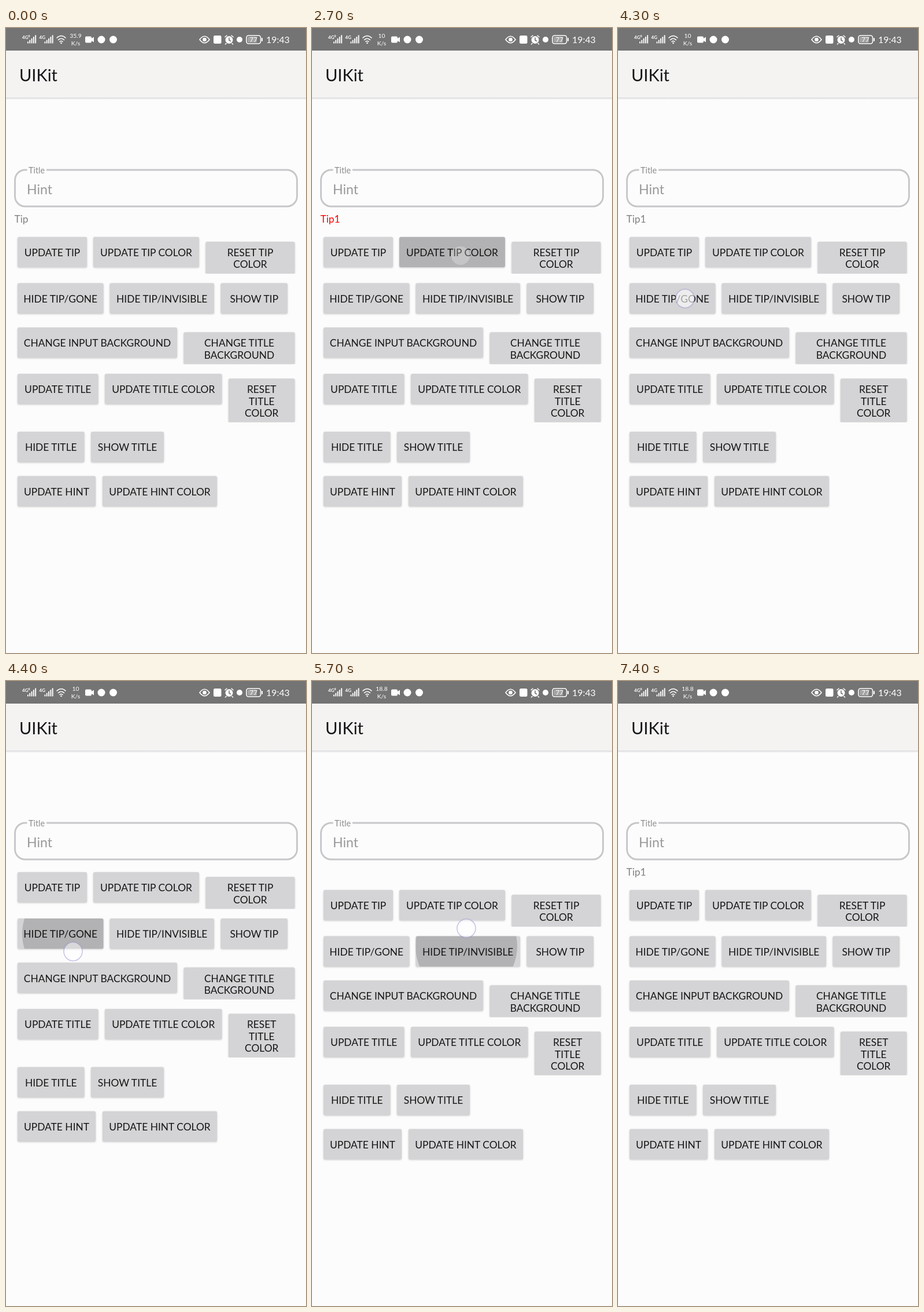
These frames come from a looping animation (519 by 1079 pixels, 8 s). An HTML page:

```html
<!DOCTYPE html>
<html lang="en">
<head>
<meta charset="utf-8">
<title>UIKit</title>
<style>
  html, body { margin: 0; width: 100%; height: 100%; overflow: hidden; background: #fcfcfc; }
  svg { display: block; width: 100%; height: 100%; font-family: Lato, "Open Sans", sans-serif; }
  .button { fill: #d4d3d5; filter: drop-shadow(0 1.5px 1.5px rgba(0, 0, 0, .2)); }
  .cut { clip-path: inset(-4px -4px 0 -4px); }
  .label { font-size: 17.4px; fill: #161616; text-anchor: middle; }
  .line { fill: none; stroke: #fff; stroke-width: 1.6; stroke-linecap: round; }
</style>
</head>
<body>
<svg id="stage" viewBox="0 0 519 1079" xmlns="http://www.w3.org/2000/svg">
  <defs>
    <linearGradient id="edge" x2="0" y2="1">
      <stop offset="0" stop-color="#d8d8dc"/>
      <stop offset="1" stop-color="#fcfcfc"/>
    </linearGradient>
    <clipPath id="pressed"><rect id="pressedRect" rx="3"/></clipPath>
  </defs>
  <rect width="519" height="1079" fill="#fcfcfc"/>

  <rect y="38" width="519" height="82" fill="#f4f3f2"/>
  <rect y="120" width="519" height="4" fill="url(#edge)"/>
  <text x="23" y="91.500" font-size="29" fill="#151518">UIKit</text>

  <rect width="519" height="39" fill="#747474"/>
  <g id="status" fill="#fff">
    <g id="signals"></g>
    <path class="line" d="M88 17q7.500-7 15 0M90.500 20.500q5-4.500 10 0M93 23.500q2.500-2 5 0"/>
    <circle cx="95.500" cy="26" r="1.300"/>
    <g font-size="10.400" text-anchor="middle">
      <text id="speed" x="120.500" y="17.300"></text>
      <text x="120.500" y="30">K/s</text>
    </g>
    <path d="M139 14.500h7q2 0 2 2v1.500l4-2.500v9l-4-2.500v1.500q0 2-2 2h-7q-2 0-2-2v-7q0-2 2-2z"/>
    <circle cx="165" cy="20" r="6.500"/>
    <circle cx="185.500" cy="20" r="6.500"/>
    <path class="line" d="M335 20q8.500-11.500 17 0q-8.500 11.500-17 0z"/>
    <circle cx="343.500" cy="20" r="3.300"/>
    <rect x="359" y="13" width="13.500" height="14" rx="2.500"/>
    <circle cx="386" cy="20.500" r="6.500"/>
    <path class="line" d="M379 15.500l3-2.500M393 15.500l-3-2.500M381 26.500l-1.500 1.500M391 26.500l1.500 1.500"/>
    <path class="line" style="stroke:#747474" d="M386 17v4l2.500 1.500"/>
    <circle cx="404" cy="20" r="5"/>
    <rect class="line" x="416" y="13" width="24.500" height="14" rx="3.500"/>
    <rect x="418" y="15" width="16" height="10" rx="1.500" opacity=".35"/>
    <rect x="442" y="17" width="2" height="6" rx="1"/>
    <text x="428.200" y="24.200" font-size="11.500" text-anchor="middle">77</text>
    <text x="450" y="25.800" font-size="15.900">19:43</text>
  </g>

  <rect x="15.500" y="245" width="488" height="63" rx="17.500" fill="none" stroke="#c7c6ca" stroke-width="2.900"/>
  <rect x="36.500" y="240" width="33.500" height="10" fill="#fcfcfc"/>
  <text x="39" y="251" font-size="14.400" fill="#8c8c8c">Title</text>
  <text x="36" y="287" font-size="23.100" fill="#999">Hint</text>
  <text id="tip" x="14.500" y="336" font-size="17.300"></text>

  <g id="panel">
    <g id="buttons"></g>
    <g clip-path="url(#pressed)"><circle id="ripple"/></g>
    <g id="labels"></g>
  </g>
  <circle id="touch" r="16" fill="#fff" stroke="#8f8fd0" stroke-width="1.600"/>
</svg>
<script>
const LOOP = 8000, STEP = 100, GONE_SHIFT = -30.7, LINE_HEIGHT = 20.4;
const $ = id => document.getElementById(id);

function set(node, attrs) {
  for (const key in attrs) node.setAttribute(key, attrs[key]);
}
function add(parent, tag, attrs, text = '') {
  const node = document.createElementNS('http://www.w3.org/2000/svg', tag);
  set(node, attrs);
  node.textContent = text;
  parent.appendChild(node);
}

// Each row: top edge, then [label, left, right]; "|" breaks a line.
const rows = [
  [360.7, ['UPDATE TIP', 20, 140], ['UPDATE TIP COLOR', 151, 334], ['RESET TIP|COLOR', 345.5, 499.5]],
  [440.6, ['HIDE TIP/GONE', 20, 168.5], ['HIDE TIP/INVISIBLE', 179.5, 360], ['SHOW TIP', 371.5, 487]],
  [517, ['CHANGE INPUT BACKGROUND', 20, 296], ['CHANGE TITLE|BACKGROUND', 307.5, 499.5]],
  [596.9, ['UPDATE TITLE', 20, 159.5], ['UPDATE TITLE COLOR', 171, 373.5], ['RESET|TITLE|COLOR', 385, 499.5]],
  [697.1, ['HIDE TITLE', 20, 135.5], ['SHOW TITLE', 147, 273]],
  [773.5, ['UPDATE HINT', 20, 155], ['UPDATE HINT COLOR', 167, 365]]
];
const boxes = {};
for (const [top, ...items] of rows) {
  for (const [name, left, right] of items) {
    const lines = name.split('|'), single = lines.length === 1;
    const box = boxes[name] = {
      x: left,
      y: single ? top : top + 8.3,
      width: right - left,
      height: single ? 52.3 : 14.4 + LINE_HEIGHT * lines.length
    };
    add($('buttons'), 'rect', { ...box, rx: 2.5, class: single ? 'button' : 'button cut' });
    lines.forEach((line, i) => add($('labels'), 'text', {
      class: 'label', x: (left + right) / 2, y: top + 33.3 + i * LINE_HEIGHT
    }, line));
  }
}

for (const x of [28, 57.5]) {
  add($('signals'), 'text', { x, y: 18.5, 'font-size': 8, 'font-weight': 700 }, '4G');
  for (let i = 0; i < 5; i++) {
    const height = 3 + i * 2.8;
    add($('signals'), 'rect', { x: x + 9 + i * 3.3, y: 26.5 - height, width: 1.9, height });
  }
}
add($('signals'), 'text', { x: 38.5, y: 16, 'font-size': 5, 'font-weight': 700 }, 'R');

const GREY = '#808080';
const taps = [
  { at: 1300, name: 'UPDATE TIP', x: 82, y: 390, result: { text: 'Tip1' } },
  { at: 2500, name: 'UPDATE TIP COLOR', x: 257, y: 393, result: { fill: '#f00' } },
  { at: 3500, name: 'RESET TIP|COLOR', x: 432, y: 397, result: { fill: GREY } },
  { at: 4300, name: 'HIDE TIP/GONE', x: 116, y: 467, result: { visible: false, shift: GONE_SHIFT } },
  { at: 5600, name: 'HIDE TIP/INVISIBLE', x: 267, y: 427, result: { shift: 0 } },
  { at: 6800, name: 'SHOW TIP', x: 430, y: 466, result: { visible: true } }
];

// Linear interpolation through [time, value] points.
function track(points, t) {
  const i = points.findIndex(p => p[0] > t);
  if (i < 0) return points[points.length - 1][1];
  if (i === 0) return points[0][1];
  const [t0, v0] = points[i - 1], [t1, v1] = points[i];
  return v0 + (v1 - v0) * (t - t0) / (t1 - t0);
}

function render(time) {
  const t = Math.floor((time % LOOP) / STEP) * STEP;
  const state = { text: 'Tip', fill: GREY, visible: true, shift: 0 };
  let tap = null, shiftAtTouch = 0;
  for (const item of taps) {
    if (t >= item.at) {
      tap = item;
      shiftAtTouch = state.shift;
    }
    if (t >= item.at + 100) Object.assign(state, item.result);
  }

  $('speed').textContent = t < 2200 ? '35.9' : t < 5200 ? '10' : '18.8';
  $('tip').textContent = state.visible ? state.text : '';
  set($('tip'), { fill: state.fill });
  set($('panel'), { transform: `translate(0 ${state.shift})` });

  const age = tap ? t - tap.at : Infinity;
  set($('ripple'), { opacity: track([[0, 0], [100, .16], [200, .16], [300, .06], [500, 0]], age) });
  set($('touch'), {
    'fill-opacity': track([[0, .6], [100, .5], [200, .25], [300, 0]], age),
    'stroke-opacity': track([[0, .5], [100, .5], [200, 0]], age)
  });
  if (tap) {
    set($('pressedRect'), boxes[tap.name]);
    set($('ripple'), { cx: tap.x, cy: tap.y - shiftAtTouch, r: age * .88 });
    set($('touch'), { cx: tap.x, cy: tap.y });
  }
}

const start = performance.now();
function tick() {
  render(performance.now() - start);
  requestAnimationFrame(tick);
}
tick();
</script>
</body>
</html>
```
